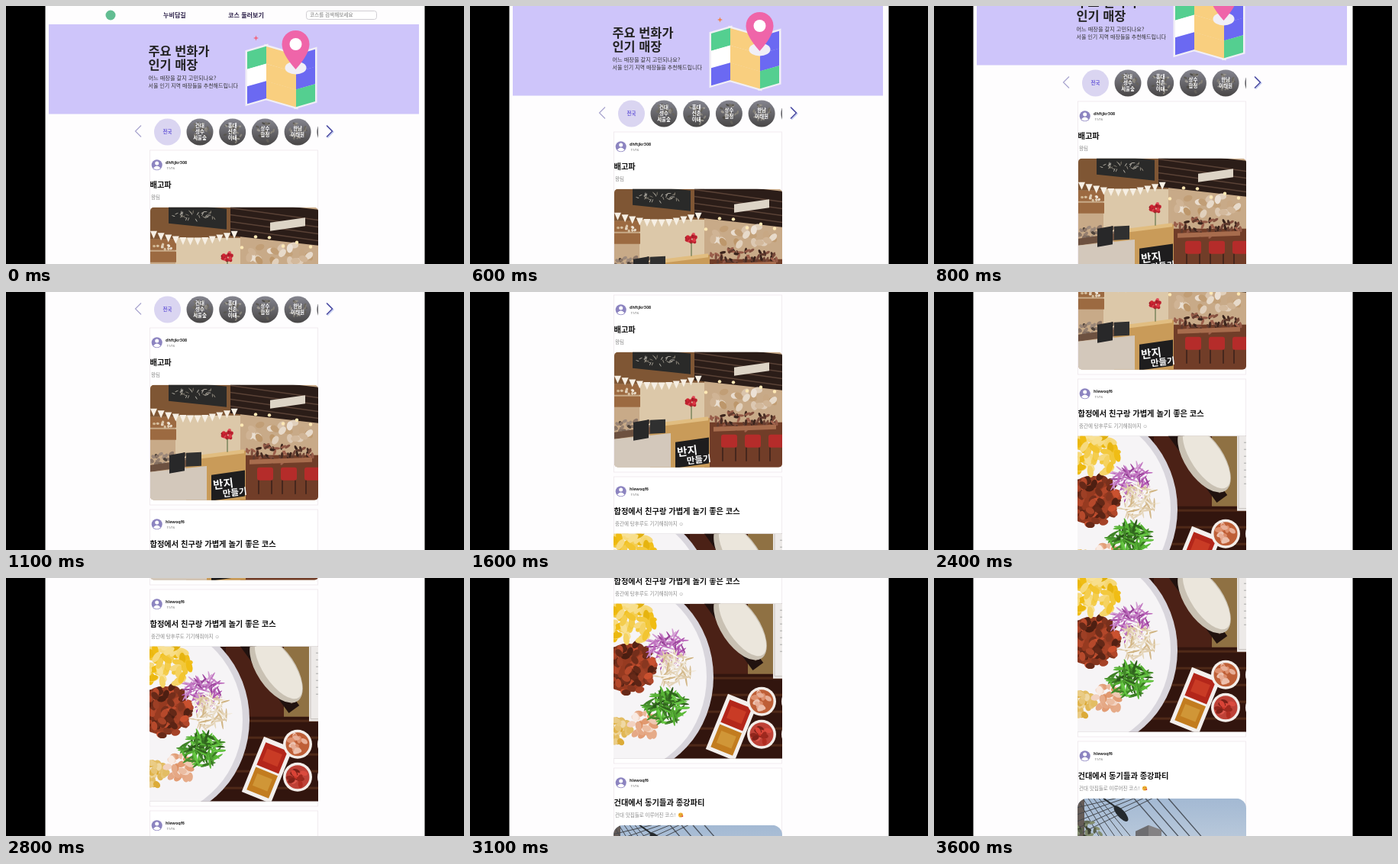
Animation of 600 by 338 pixels, one loop 3.7 s. Source, as an HTML page:

```html
<!DOCTYPE html>
<html lang="ko">
<head>
<meta charset="utf-8">
<title>코스 둘러보기</title>
<style>
html, body { margin: 0; width: 100%; height: 100%; overflow: hidden; background: #000; }
svg { display: block; font-family: "Noto Sans CJK KR", "Noto Sans CJK JP", "Noto Sans", sans-serif; }
.latin { font-family: "Noto Sans", "Open Sans", sans-serif; }
</style>
</head>
<body>
<svg id="stage" width="600" height="338" viewBox="0 0 600 338"></svg>
<script>
const LOOP = 3700, STEP = 100;
// Scroll position: [time in ms, offset in px]
const STOPS = [[0, 0], [600, 24], [1100, 142], [1900, 212], [2400, 313], [3100, 468], [3600, 503]];

let seed = 7;
const rnd = () => (seed = (seed * 16807) % 2147483647) / 2147483647;
const repeat = (n, part) => Array.from({ length: n }, (_, i) => part(i)).join('');

// Drawing helpers; text is placed by its vertical centre
const text = (x, cy, size, str, fill = '#222', attrs = '') =>
  `<text x="${x}" y="${cy + size * .37}" font-size="${size}" fill="${fill}" ${attrs}>${str}</text>`;
const bold = (x, cy, size, str, fill, attrs = '') => text(x, cy, size, str, fill, 'font-weight="700" ' + attrs);
const rect = (x, y, w, h, fill, attrs = '') =>
  `<rect x="${x}" y="${y}" width="${w}" height="${h}" fill="${fill}" ${attrs}/>`;
const oval = (x, y, rx, ry, fill, turn = 0) =>
  `<ellipse cx="${x}" cy="${y}" rx="${rx}" ry="${ry}" fill="${fill}" transform="rotate(${turn} ${x} ${y})"/>`;
const disc = (x, y, r, fill) => oval(x, y, r, r, fill);
const line = (d, stroke, w = 1) => `<path d="${d}" fill="none" stroke="${stroke}" stroke-width="${w}"/>`;
const group = (transform, body) => `<g transform="${transform}">${body}</g>`;
const slant = (x, y, w, h, angle, fill, attrs) =>
  group(`translate(${x} ${y}) skewY(${angle})`, rect(0, 0, w, h, fill, attrs));

// Random bits of one hue spread over an area of radius r
function scatter(cx, cy, r, n, [hue, sat, light], a, b, flat = 1) {
  return repeat(n, () => {
    const angle = rnd() * 2 * Math.PI, d = Math.sqrt(rnd()) * r;
    const shade = Math.round(light + (rnd() - .5) * 32);
    return oval((cx + Math.cos(angle) * d).toFixed(1), (cy + Math.sin(angle) * d * flat).toFixed(1),
      a, b, `hsl(${hue} ${sat}% ${shade}%)`, Math.round(rnd() * 180));
  });
}

function header() {
  return disc(137, 12, 6.5, '#62bd92') +
    bold(206, 12, 8.1, '누비담길', '#2c2049') +
    bold(291, 12, 8.1, '코스 둘러보기', '#2c2049') +
    rect(393.5, 6.5, 92, 11, '#fff', 'rx="3" stroke="#c4c2c8" stroke-width=".8"') +
    text(398, 12, 6.6, '코스를 검색해보세요', '#777');
}

function foldedMap() {
  const green = '#54cf90', blue = '#6b69f2', sand = '#f9cf7f', height = 68;
  const panels = [
    { x: 316, y: 60, w: 25, bands: [green, '#fff', blue] },
    { x: 341, y: 53, w: 39, bands: [sand, sand, sand] },
    { x: 380, y: 64, w: 25, bands: [blue, blue, green] }
  ];
  const draw = paint => panels.map((p, i) => paint(p, i % 2 ? 16 : -16)).join('');
  return draw((p, a) => slant(p.x, p.y, p.w, height, a, '#f1eff6', 'stroke="#f1eff6" stroke-width="5"')) +
    draw((p, a) => p.bands.map((c, k) => slant(p.x, p.y + k * height / 3, p.w, height / 3 + .2, a, c)).join(''));
}

function banner() {
  return rect(56, 24, 485, 117.5, '#cec5fa') +
    bold(186.5, 59, 16.4, '주요 번화가') +
    bold(186.5, 77, 16.4, '인기 매장') +
    text(186.5, 94, 7.2, '어느 매장을 갈지 고민되나요?', '#333') +
    text(186.5, 104, 7, '서울 인기 지역 매장들을 추천해드립니다', '#333') +
    '<path id="spark" d="M327.500 38.500l.9 2.600 2.600.9-2.600.9-.9 2.600-.9-2.600-2.600-.9 2.600-.9Z"/>' +
    foldedMap() + oval(379.5, 81, 14, 8.5, '#f1eff6') +
    '<path d="M379.500 83q-18-20-18-33a18 18 0 0 1 36 0q0 13-18 33Z" fill="#ef65a9"/>' +
    disc(379.5, 50, 8, '#fff');
}

function carousel() {
  const places = ['건대 성수 서울숲', '홍대 신촌 이대', '상수 합정', '한남 이태원', ''];
  const label = (x, y, str, fill) => bold(x, y, 6.4, str, fill, 'text-anchor="middle"');
  const circles = places.map((place, i) => {
    const x = 254 + i * 42.7, names = place.split(' ');
    return disc(x, 165, 17.5, 'url(#city)') + scatter(x, 166, 13, 22, [40, 5, 45], 2.5, 1.2) +
      names.map((name, k) => label(x, 165 + (k - (names.length - 1) / 2) * 8, name, '#fff')).join('');
  }).join('');
  return '<g clip-path="url(#row)">' + disc(211.5, 165, 17.5, '#dad5f1') + label(211.5, 165, '전국', '#6a5bd8') + circles + '</g>' +
    line('M177 156.500l-7.500 7.500 7.500 7.500', '#a9a5cf', 1.2) +
    line('M421 157.500l7.500 7.500-7.500 7.500', '#c4cdf0', 2) +
    line('M420 156.500l7.500 7.500-7.500 7.500', '#43419b', 1.3);
}

function cafe() {
  const flag = i => {
    const y = 31 + 9 * Math.sin(i / 11 * Math.PI);
    return `<path d="M${i * 9.6} ${y}h9l-4.500 10Z" fill="#f6efe4"/>`;
  };
  const chair = i => rect(140 + i * 31, 108, 21, 17, '#b52c2a', 'rx="3"') +
    line(`M${142 + i * 31} 125v18m17 0v-18`, '#38201a', 1.5);
  const lamp = i => disc(120 + i * 18, 35 + rnd() * 18, 2.2, '#ffe9b5');
  const room = rect(0, 0, 220, 151, '#c8aa88') + rect(0, 0, 118, 42, '#7f5634') + rect(33, 40, 85, 58, '#dcc8a9') +
    slant(105, -10, 115, 47, 6.5, '#2b1d18') + repeat(4, i => slant(105, i * 9, 115, 1.5, 8, '#5a4236')) +
    slant(157, 20, 46, 11, -8, '#ddd4c6') +
    slant(24, -6, 76, 27, 6, '#2a2a29') + scatter(60, 11, 32, 30, [40, 8, 58], 2.5, .5, .2) +
    repeat(2, i => rect(0, 42 + i * 16, 34, 14, '#9c6a41')) + scatter(17, 53, 14, 10, [35, 40, 75], 2, 1.6, .3);
  const tables = rect(118, 92, 102, 59, '#713d28') + scatter(170, 62, 42, 24, [32, 38, 72], 6, 4, .4) +
    scatter(170, 90, 48, 60, [15, 35, 32], 4, 1.6, .25) + slant(130, 98, 82, 6, -2, '#a76c4d') + repeat(3, chair);
  const counter = scatter(30, 97, 34, 40, [25, 15, 42], 3, 2, .25) +
    slant(0, 105, 122, 9, -8, '#6d5140') + slant(47, 96, 78, 66, -7, '#c99b59') +
    slant(47, 94, 76, 5, -7, '#e1bd80') + slant(0, 114, 74, 46, -6, '#d3c8bb') +
    slant(25, 92, 20, 24, -10, '#282829') + slant(47, 89, 20, 18, -3, '#303030') +
    slant(80, 118, 44, 34, -8, '#1e1d1e') +
    group('rotate(-7 100 135)', bold(83, 129, 14.5, '반지', '#fff') + bold(94, 142, 11.5, '만들기', '#fff'));
  return room + repeat(12, flag) + tables + counter +
    scatter(101, 64, 7, 20, [355, 70, 46], 2.3, 2.3) + line('M101 70v18', '#4b6437') + repeat(6, lamp);
}

function food() {
  // Each heap sits on a ring in the bowl: angle, radius, amount, colour, bit size
  const heaps = [
    [-78, 31, 60, [46, 88, 62], 8, 4],
    [92, 17, 26, [42, 70, 65], 5, 4],
    [62, 19, 30, [22, 65, 78], 6, 4],
    [-30, 24, 80, [300, 38, 58], 8, 1.1],
    [-8, 23, 75, [38, 45, 82], 9, 1.1],
    [33, 25, 90, [104, 54, 38], 9, 1.5]
  ];
  const heap = ([angle, r, n, color, a, b]) => {
    const turn = angle * Math.PI / 180;
    return scatter(8 + 72 * Math.cos(turn), 95 + 72 * Math.sin(turn), r, n, color, a, b, .9);
  };
  const cup = i => {
    const x = 194 + (i >> 1) * 45, y = 128 + i % 2 * 43;
    const color = i % 2 ? [5, 68, 42] : [18, 62, 72];
    return disc(x, y, 19, '#f3eeea') + disc(x, y, 15.5, `hsl(${color[0]} 55% 48%)`) + scatter(x, y, 11, 14, color, 5, 3);
  };
  const sauce = i => rect(5, 6 + i * 35, 31, 32, ['#b3261a', '#c27c1f'][i]) +
    rect(10, 13 + i * 35, 21, 17, ['#c93b25', '#d09637'][i]);
  return rect(0, 0, 221, 203, '#32150e') + repeat(5, i => rect(0, 96 + i * 22, 221, 3, '#4f2918')) +
    rect(100, 0, 121, 92, '#4b2116') + rect(176, 0, 33, 92, '#8f7143') +
    oval(11, 96, 120, 130, '#d8d5dc') + oval(8, 96, 114, 125, '#f6f4f6') +
    disc(18, 84, 32, '#963a20') + scatter(20, 84, 33, 90, [13, 62, 34], 6, 4) + heaps.map(heap).join('') +
    group('translate(119 0) rotate(54)', rect(-20, -17, 128, 17, '#21120f') + rect(0, -13, 100, 3, '#765e4e')) +
    oval(166, 30, 50, 25, '#c9c1b3', 56) + oval(169, 28, 47, 20, '#ebe6dc', 56) +
    rect(209, 0, 12, 98, '#edeae8') + line('M211 0v95h10', '#c6bfba') + repeat(7, i => rect(218, 8 + i * 9, 3, 1, '#aaa')) +
    group('translate(150 118) rotate(22)', rect(0, 0, 41, 78, '#f3efed') + repeat(2, sauce)) + repeat(4, cup);
}

function street() {
  const wires = repeat(4, i => line(`M${74 + i * 15} 0l52 60`, '#4b525c', 1.3)) +
    repeat(5, i => line(`M${i * 7} 0l${34 + i * 4} 60M0 ${12 + i * 9}L${50 + i * 12} 0`, '#44484e'));
  return rect(0, 0, 221, 110, 'url(#sky)') + slant(0, 0, 9, 110, 0, '#655c58') + wires +
    line('M34 0l17 12', '#252a2e', 2) + oval(57, 20, 13, 5, '#252a2e', 48) +
    scatter(12, 45, 20, 32, [80, 12, 36], 4, 2, .7) +
    slant(76, 43, 17, 60, -25, '#6d6d70') + slant(93, 35, 17, 60, 20, '#848284');
}

function card(top, { user, title, note, photo, height, inset = 0, radius = 0 }) {
  return rect(188.5, top, 220, height + 81, '#fff', 'stroke="#eee7ec" stroke-width=".8"') +
    disc(197.7, top + 19.3, 7, '#8c84c0') + disc(197.7, top + 17, 2.5, '#fff') +
    `<path d="M192.900 ${top + 23.5}q4.800-6 9.600 0q-4.800 4-9.600 0Z" fill="#fff"/>` +
    bold(209, top + 15.7, 5.4, user, '#222', 'class="latin"') +
    text(210.5, top + 23.5, 4, '11/16', '#555', 'class="latin"') +
    bold(188.5, top + 44.8, 10.25, title, '#111') +
    text(190, top + 61.5, 6.5, note, '#888') +
    `<clipPath id="photo${top}"><rect width="${221 - inset}" height="${height}" rx="${radius}"/></clipPath>` +
    group(`translate(${188 + inset} ${top + 74.7})`, `<g clip-path="url(#photo${top})">${photo}</g>`);
}

function feed() {
  const posts = [
    { user: 'dhftjkr308', title: '배고파', note: '왕팀', photo: cafe(), height: 151, inset: 1, radius: 5 },
    { user: 'hlewoqf6', title: '합정에서 친구랑 가볍게 놀기 좋은 코스', note: '중간에 탕후루도 기기해줘야지 ☺', photo: food(), height: 203 },
    { user: 'hlewoqf6', title: '건대에서 동기들과 종강파티', note: '건대 맛집들로 이루어진 코스!', photo: street(), height: 110, radius: 13 }
  ];
  let top = 189;
  const cards = posts.map(post => {
    const out = card(top, post);
    top += post.height + 87;
    return out;
  }).join('');
  const kiss = disc(276, 778.5, 3.1, '#f3b437') + line('M274.300 777.500h1m1.500 0h1m-2.300 2.500h1.300', '#70451b', .6) +
    disc(278.3, 780, 1, '#df3f4d');
  return cards + kiss;
}

const gradient = (id, from, to) =>
  `<linearGradient id="${id}" x2="0" y2="1"><stop stop-color="${from}"/><stop offset="1" stop-color="${to}"/></linearGradient>`;

document.getElementById('stage').innerHTML =
  `<defs>${gradient('city', '#85858f', '#484646')}${gradient('sky', '#a3b9d3', '#d0d9e3')}
  <clipPath id="row"><rect x="188" y="140" width="221" height="50"/></clipPath></defs>` +
  rect(51.5, 0, 497, 338, '#fefdfe') +
  '<g id="page">' + header() + banner() + carousel() + feed() + '</g>';

const page = document.getElementById('page'), spark = document.getElementById('spark');

// Monotone cubic interpolation through the scroll stops
const slopes = STOPS.slice(1).map(([t, y], i) => (y - STOPS[i][1]) / (t - STOPS[i][0]));
const tangents = STOPS.map((_, i) => {
  const a = slopes[i - 1], b = slopes[i];
  return a && b ? 2 * a * b / (a + b) : 0;
});
function scrollAt(t) {
  const i = Math.max(0, STOPS.findIndex(stop => stop[0] >= t) - 1);
  const [t0, y0] = STOPS[i], [t1, y1] = STOPS[i + 1];
  const h = t1 - t0, u = (t - t0) / h, v = 1 - u;
  return y0 * v * v * (1 + 2 * u) + y1 * u * u * (3 - 2 * u) + h * u * v * (v * tangents[i] - u * tangents[i + 1]);
}

function draw() {
  const t = Math.floor(performance.now() % LOOP / STEP) * STEP;
  page.setAttribute('transform', `translate(0 ${-Math.round(scrollAt(t))})`);
  const mix = (1 - Math.cos(t / 600 * Math.PI)) / 2;
  spark.setAttribute('fill', `rgb(240 ${104 + 26 * mix} ${128 - 52 * mix})`);
  requestAnimationFrame(draw);
}
draw();
</script>
</body>
</html>
```
